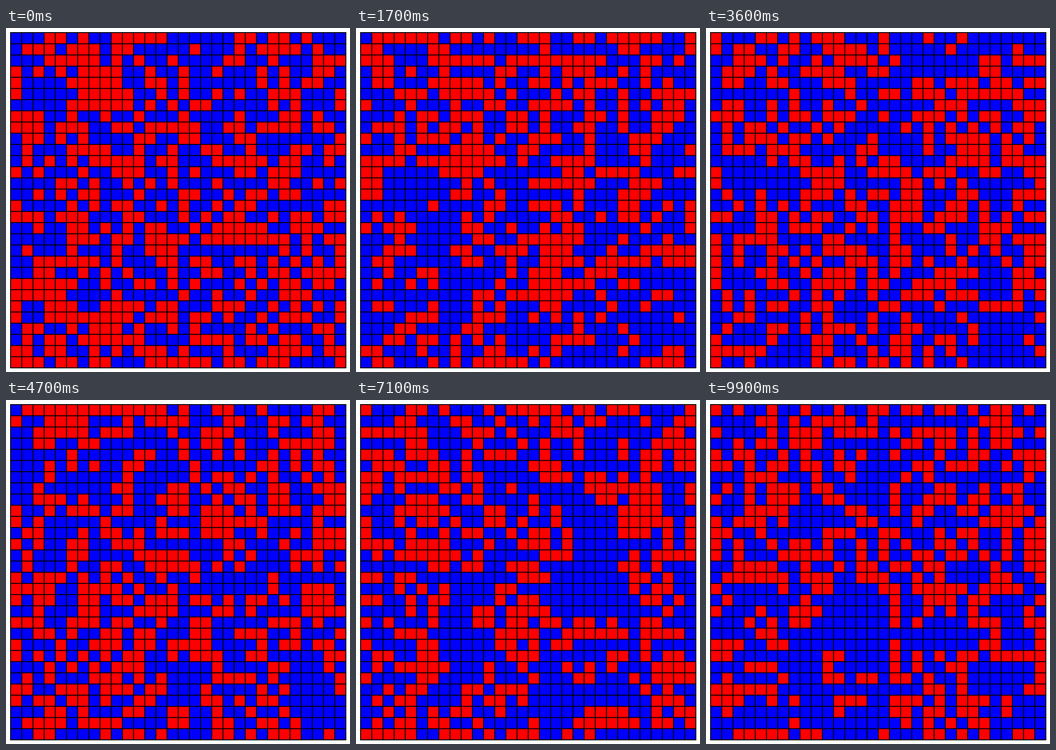
A matplotlib script that plays this animation: 748x748 px, repeating every 10000 ms.

```python
import numpy as np
import matplotlib.pyplot as plt
from matplotlib.animation import FuncAnimation
from matplotlib.colors import ListedColormap

SIZE = 748
DPI = 100
CELLS = 30
LEFT, RIGHT = 10, 739
FRAMES = 100
BIRTH = (3, 5, 7)
SURVIVE = (1, 3, 5, 8)
PX = 72 / DPI


def step(grid):
    """Advance the cellular automaton by one generation on a torus."""
    near = sum(
        np.roll(grid, (dy, dx), axis=(0, 1))
        for dy in (-1, 0, 1)
        for dx in (-1, 0, 1)
        if dy or dx
    )
    alive = np.where(grid == 1, np.isin(near, SURVIVE), np.isin(near, BIRTH))
    return alive.astype(int)


def history(seed=7):
    rng = np.random.default_rng(seed)
    grids = [(rng.random((CELLS, CELLS)) < 0.48).astype(int)]
    while len(grids) < FRAMES:
        grids.append(step(grids[-1]))
    return grids


grids = history()
edges = np.linspace(LEFT, RIGHT, CELLS + 1)

fig = plt.figure(figsize=(SIZE / DPI, SIZE / DPI), dpi=DPI, facecolor="white")
ax = fig.add_axes([0, 0, 1, 1])
ax.set_xlim(0, SIZE)
ax.set_ylim(SIZE, 0)
ax.axis("off")

mesh = ax.pcolormesh(
    edges, edges, grids[0],
    cmap=ListedColormap(["#0000ff", "#ff0000"]), vmin=0, vmax=1,
)
style = dict(colors="black", linewidth=2 * PX, snap=False, capstyle="butt")
ax.vlines(edges, LEFT - 1, RIGHT + 1, **style)
ax.hlines(edges, LEFT - 1, RIGHT + 1, **style)


def draw(i):
    mesh.set_array(grids[i])
    return (mesh,)


anim = FuncAnimation(fig, draw, frames=FRAMES, interval=100,
                     repeat=True, repeat_delay=0)
plt.show()
```
